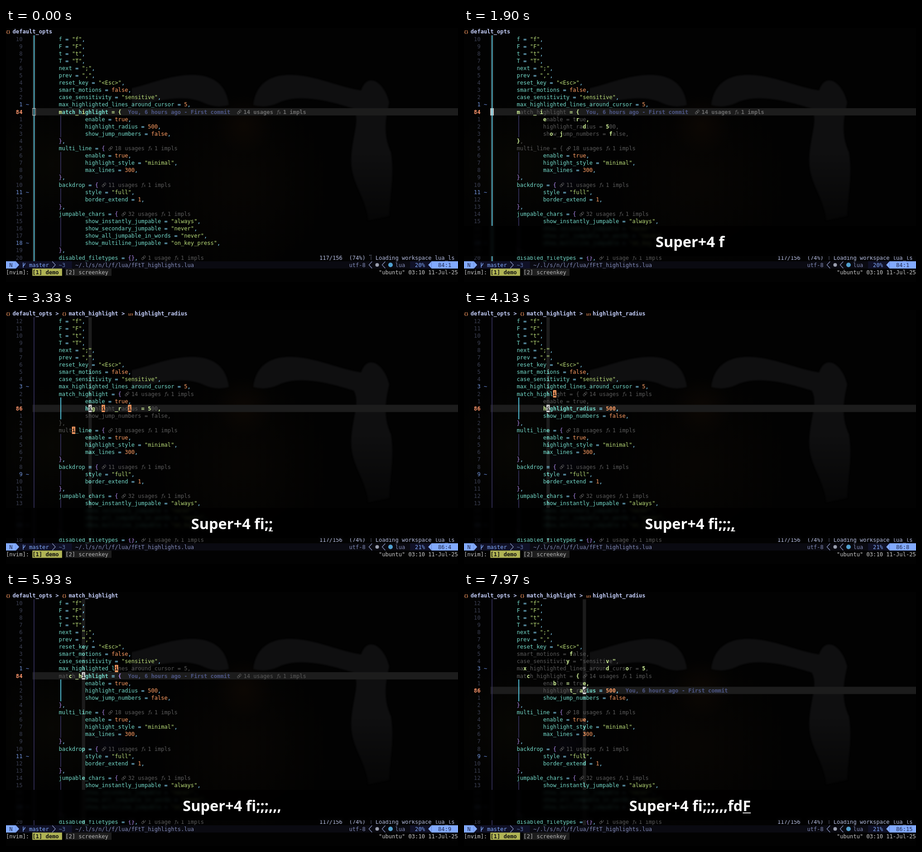
Write an HTML page with a canvas that moves like this. It is 998x561 px and loops after 8 s.

```html
<!DOCTYPE html>
<html lang="en">
<head>
<meta charset="utf-8">
<title>Editor motion demo</title>
<style>
html, body { margin: 0; width: 100%; height: 100%; overflow: hidden; background: #000; }
canvas { display: block; }
</style>
</head>
<body>
<canvas id="stage" width="998" height="561"></canvas>
<script>
const cv = document.getElementById('stage');
const ctx = cv.getContext('2d');
const WIDTH = 998, HEIGHT = 561, LOOP = 8000;
const CW = 7.283, RH = 16.1;
const MONO = '"DejaVu Sans Mono", monospace';
const REGULAR = `12.1px ${MONO}`, BOLD = `bold 12.1px ${MONO}`;

const C = {
  key: '#73daca', op: '#89ddff', str: '#b9dc78', num: '#ff9e64', brace: '#b18cf0',
  dim: '#5a5a5a', hit: '#ff9e64', jump: '#d3f59b', title: '#c0caf5',
  lens: '#5b5b5b', blame: '#4d5685', bar: '#1c1c1c', blue: '#82aaff', soft: '#828bb8'
};

// Code lines: column, text, usage count
const lines = [
  null,
  [16, 'f = "f",'], [16, 'F = "F",'], [16, 't = "t",'], [16, 'T = "T",'],
  [16, 'next = ";",'], [16, 'prev = ",",'], [16, 'reset_key = "<Esc>",'],
  [16, 'smart_motions = false,'], [16, 'case_sensitivity = "sensitive",'],
  [16, 'max_highlighted_lines_around_cursor = 5,'],
  [16, 'match_highlight = {', '14 usages'],
  [24, 'enable = true,'], [24, 'highlight_radius = 500,'], [24, 'show_jump_numbers = false,'],
  [16, '},'],
  [16, 'multi_line = {', '18 usages'],
  [24, 'enable = true,'], [24, 'highlight_style = "minimal",'], [24, 'max_lines = 300,'],
  [16, '},'],
  [16, 'backdrop = {', '11 usages'],
  [24, 'style = "full",'], [24, 'border_extend = 1,'],
  [16, '},'],
  [16, 'jumpable_chars = {', '32 usages'],
  [24, 'show_instantly_jumpable = "always",'], [24, 'show_secondary_jumpable = "never",'],
  [24, 'show_all_jumpable_in_words = "never",'], [24, 'show_multiline_jumpable = "on_key_press",'],
  [16, '},'],
  [16, 'disabled_filetypes = {},', '1 usage']
].map(l => l && { col: l[0], text: l[1], lens: l[2], colors: colorize(l[1]) });
const changed = [10, 22, 29];

function colorize(text) {
  const out = [];
  for (const [tok] of text.matchAll(/"[^"]*"|\w+|./g)) {
    const color = tok[0] === '"' ? C.str
      : /^(true|false|\d+)$/.test(tok) ? C.num
      : /\w/.test(tok) ? C.key
      : /[{}]/.test(tok) ? C.brace : C.op;
    for (const _ of tok) out.push(color);
  }
  return out;
}

// Key presses: time, key, cursor row, cursor column, direction, searched char, waiting for a char
const steps = [
  [0, '', 11, 8, 1], [450, 'Super+4', 11, 8, 1], [1500, 'f', 11, 8, 1, '', true],
  [2100, 'i', 11, 23, 1, 'i'], [2600, ';', 11, 27, 1, 'i'], [3100, ';', 13, 25, 1, 'i'],
  [3620, ';', 13, 29, 1, 'i'], [4120, ',', 13, 25, -1, 'i'], [4640, ',', 11, 27, -1, 'i'],
  [5130, ',', 11, 23, -1, 'i'], [6130, 'f', 11, 23, 1, '', true],
  [6870, 'd', 13, 36, 1, 'd'], [7770, 'F', 13, 36, -1, '', true]
].map(([at, key, row, col, dir, find, pending]) => ({ at, key, row, col, dir, find, pending }));

let typed = '', moved = -1000;
steps.forEach((s, i) => {
  const last = steps[i - 1];
  typed += (i === 2 ? ' ' : '') + s.key;
  if (last && (last.row !== s.row || last.col !== s.col)) moved = s.at;
  s.typed = typed;
  s.moved = moved;
  Object.assign(s, marks(s));
});

// Visits the characters from the cursor onwards, up to five lines away
function* walk({ row, col, dir }) {
  for (let k = 0; k <= 5; k++) {
    const r = row + dir * k, l = lines[r];
    if (!l) return;
    const n = l.text.length;
    let i = k ? (dir > 0 ? 0 : n - 1) : col - l.col + dir;
    if (dir > 0) i = Math.max(0, i);
    for (; i >= 0 && i < n; i += dir) yield [r, i, l.text[i]];
  }
}

function marks(s) {
  const id = (r, i) => r * 100 + i;
  const dim = new Set(), jump = new Set(), hit = new Set(), seen = new Set();
  const path = [];
  let used = false, lastRow = s.row, end = -1, otherRow = false;
  for (const [r, i, ch] of walk(s)) {
    path.push(id(r, i));
    const word = /[A-Za-z0-9]/.test(ch);
    if (!word || r !== lastRow) used = false;
    lastRow = r;
    if (ch !== ' ' && !seen.has(ch) && !used && (s.pending || r === s.row)) {
      jump.add(id(r, i));
      used = word;
    }
    seen.add(ch);
    if (s.find && ch === s.find && !otherRow) {
      hit.add(id(r, i));
      end = path.length;
      otherRow = r !== s.row;
    }
  }
  path.slice(0, s.pending ? path.length : Math.max(0, end)).forEach(p => dim.add(p));
  return { dim, jump, hit };
}

const stepAt = t => steps.findLast(s => s.at <= t) || steps[0];

function box(col, row, cols, color) {
  ctx.fillStyle = color;
  ctx.fillRect(col * CW, row * RH, cols * CW, RH);
}

function put(str, col, row, color, bold) {
  ctx.font = bold ? BOLD : REGULAR;
  ctx.fillStyle = color;
  [...str].forEach((ch, i) => ch !== ' ' && ctx.fillText(ch, (col + i) * CW, row * RH + 12.4));
}

function small(str, col, row, color, font, dy = 11.5) {
  ctx.font = font;
  ctx.fillStyle = color;
  ctx.fillText(str, col * CW, row * RH + dy);
}

function poly(points, color) {
  ctx.fillStyle = color;
  ctx.beginPath();
  points.forEach(([x, y]) => ctx.lineTo(x, y));
  ctx.fill();
}

function chevron(col, dir) {
  const x = (col + 0.5) * CW, y = 32.5 * RH;
  ctx.strokeStyle = '#8f9ac6';
  ctx.lineWidth = 1.1;
  ctx.beginPath();
  ctx.moveTo(x - 3.5 * dir, y - 7.5);
  ctx.lineTo(x + 3.5 * dir, y);
  ctx.lineTo(x - 3.5 * dir, y + 7.5);
  ctx.stroke();
}

function dot(x, y, r, color) {
  ctx.fillStyle = color;
  ctx.beginPath();
  ctx.arc(x, y, r, 0, 7);
  ctx.fill();
}

function drawLens(l, col, row, bold) {
  const color = bold ? '#6c6c6c' : C.lens;
  ctx.save();
  ctx.translate((col + 0.7) * CW, (row + 0.52) * RH);
  ctx.rotate(-Math.PI / 4);
  ctx.strokeStyle = color;
  ctx.lineWidth = 1;
  for (const x of [-5.2, -0.6]) {
    ctx.beginPath();
    ctx.roundRect(x, -2, 5.8, 4, 2);
    ctx.stroke();
  }
  ctx.restore();
  const fx = col + 3 + l.lens.length;
  put(l.lens, col + 2, row, color, bold);
  small('ƒ', fx, row, color, `italic 11px ${MONO}`);
  small('x', fx + 0.7, row, color, `8px ${MONO}`, 12.5);
  put('1 impls', fx + 2, row, color, bold);
}

const wall = makeWall();
function makeWall() {
  const el = document.createElement('canvas');
  el.width = WIDTH;
  el.height = HEIGHT;
  const g = el.getContext('2d');
  g.fillStyle = '#020202';
  g.fillRect(0, 0, WIDTH, HEIGHT);
  const glow = (x, y, r, rgb, a) => {
    const grad = g.createRadialGradient(x, y, 0, x, y, r);
    grad.addColorStop(0, `rgba(${rgb},${a})`);
    grad.addColorStop(1, `rgba(${rgb},0)`);
    g.fillStyle = grad;
    g.fillRect(x - r, y - r, 2 * r, 2 * r);
  };
  glow(525, 215, 65, '60,30,8', 0.14);
  glow(520, 340, 200, '45,30,10', 0.12);
  glow(220, 340, 60, '25,22,70', 0.14);
  glow(110, 300, 140, '40,36,12', 0.14);

  const fade = g.createLinearGradient(0, 270, 0, 430);
  fade.addColorStop(0, '#0f0f10');
  fade.addColorStop(1, '#050505');
  g.fillStyle = fade;
  const wing = () => {
    g.beginPath();
    g.moveTo(546, 170);
    g.bezierCurveTo(552, 118, 590, 100, 640, 104);
    g.bezierCurveTo(690, 108, 735, 130, 784, 138);
    g.bezierCurveTo(800, 92, 838, 125, 846, 165);
    g.bezierCurveTo(838, 200, 832, 235, 850, 275);
    g.bezierCurveTo(858, 325, 848, 365, 846, 415);
    g.lineTo(800, 425);
    g.bezierCurveTo(794, 370, 762, 345, 762, 290);
    g.bezierCurveTo(765, 235, 782, 205, 768, 178);
    g.bezierCurveTo(735, 168, 650, 140, 600, 166);
    g.quadraticCurveTo(572, 178, 546, 170);
    g.fill();
  };
  g.filter = 'blur(1.5px)';
  wing();
  g.translate(1038, 0);
  g.scale(-1, 1);
  g.beginPath();
  g.rect(530, 0, 230, HEIGHT);
  g.clip();
  wing();
  return el;
}

function drawTitle(s) {
  const crumb = (icon, name, col, font) => {
    small(icon, col, 0, C.num, font);
    put(name, col + 2, 0, C.title, true);
  };
  const braces = `bold 8px ${MONO}`;
  crumb('{}', 'default_opts', 0, braces);
  if (s.col > 8) {
    put('>', 15, 0, C.title, true);
    crumb('{}', 'match_highlight', 17, braces);
  }
  if (s.row === 13) {
    put('>', 35, 0, C.title, true);
    crumb('123', 'highlight_radius', 37, `bold 6px ${MONO}`);
  }
}

function drawCode(s, t) {
  const wordRow = t >= 4640 && t < 5130 ? 13 : -1;
  box(8, s.row, 130, C.bar);
  ctx.fillStyle = C.bar;
  ctx.fillRect(s.col * CW, RH, CW, 31 * RH);
  if (wordRow > 0) box(24, wordRow, 16, '#171717');

  const guide = (col, from, to, on) => {
    ctx.fillStyle = on ? '#4fb8cf' : '#37325f';
    ctx.fillRect(Math.floor((col + 0.5) * CW), from * RH, on ? 2 : 1.6, (to - from) * RH);
  };
  guide(8, 1, 32, s.col === 8);
  guide(16, 12, 15, s.col > 8);
  guide(16, 17, 20);
  guide(16, 22, 24);
  guide(16, 26, 30);

  lines.forEach((l, r) => {
    if (!l) return;
    const here = r === s.row;
    const num = String(here ? 73 + r : Math.abs(r - s.row));
    const mod = changed.includes(r);
    put(num, 5 - num.length, r, here ? '#ff966c' : mod ? '#7395dc' : '#3b3f52', here);
    if (mod) put('~', 6, r, '#6d93e8');

    [...l.text].forEach((ch, i) => {
      const id = r * 100 + i, col = l.col + i;
      const bold = here || col === s.col || (r === wordRow && i < 16);
      if (s.hit.has(id)) {
        box(col, r, 1, C.hit);
        put(ch, col, r, '#101010', true);
      } else if (s.jump.has(id)) put(ch, col, r, C.jump, true);
      else if (s.dim.has(id)) put(ch, col, r, C.dim);
      else put(ch, col, r, l.colors[i], bold);
    });

    let end = l.col + l.text.length;
    if (here && t - s.moved >= 500) {
      put('You, 6 hours ago - First commit', end + 2, r, C.blame, true);
      end += 34;
    }
    if (l.lens) drawLens(l, end + 1, r, here && s.col === 8);
  });

  if (t < 450) {
    ctx.strokeStyle = '#d0d0d0';
    ctx.lineWidth = 1;
    ctx.strokeRect(s.col * CW + 0.3, s.row * RH + 0.4, CW - 0.8, RH - 0.8);
  } else {
    box(s.col, s.row, 1, '#d8d8d8');
    if (s.col === 8) guide(8, s.row, s.row + 1, true);
    const l = lines[s.row];
    put(l.text[s.col - l.col] || ' ', s.col, s.row, '#111', true);
  }
}

function drawStatus(t) {
  const s = stepAt(Math.max(0, t - 150)), l = lines[s.row];
  put('117/156  (74%)', 95, 31, '#b4bcdf');
  for (const [x, y] of [[803, 502], [806, 502], [806, 506], [806, 510]]) dot(x, y, 0.8, C.title);
  put('Loading workspace lua_ls', 112, 31, '#b4bcdf');

  const y = 32 * RH, mid = y + RH / 2, low = y + RH;
  box(0, 32, 138, '#0a0a11');
  box(3, 32, 17, '#101127');
  box(0, 32, 3, C.blue);
  poly([[3 * CW, y], [4 * CW, mid], [3 * CW, low]], C.blue);
  put('N', 1, 32, '#222a4a');
  ctx.strokeStyle = C.blue;
  ctx.lineWidth = 1.4;
  ctx.beginPath();
  ctx.moveTo(38, y + 3);
  ctx.lineTo(38, y + 14);
  ctx.moveTo(42, y + 4);
  ctx.quadraticCurveTo(42, y + 8, 38, y + 10);
  ctx.stroke();
  put('master', 7, 32, C.blue);
  chevron(14, 1);
  put('~3', 16, 32, '#5f78b0');
  put('~/.l/s/n/l/f/lua/fFtT_highlights.lua', 21, 32, C.soft);

  put('utf-8', 104, 32, C.soft);
  chevron(110, -1);
  dot(819.5, mid, 4, '#9a9faf');
  chevron(114, -1);
  dot(849, mid, 5, '#51a0cf');
  put('lua', 118, 32, C.soft);
  box(122.5, 32, 7, '#101127');
  put(s.row === 11 ? '20%' : '21%', 124, 32, C.blue);
  poly([[129 * CW, y], [128 * CW, mid], [129 * CW, low]], C.blue);
  box(129, 32, 9, C.blue);
  put(`${73 + s.row}:${Math.max(1, s.col - l.col + l.col / 8)}`, 131, 32, '#222a4a');

  put('[nvim]:', 0, 33, '#c8c8c8');
  box(8, 33, 9, '#b0b455');
  put('[1] demo', 8, 33, '#111', true);
  box(18, 33, 14, '#1d1d1d');
  put('[2] screenkey', 18, 33, '#b8b8b8');
  put('"ubuntu" 03:10 11-Jul-25', 113, 33, '#c8c8c8');
}

function drawKeys(s, t) {
  const top = 437, h = 67;
  ctx.save();
  ctx.beginPath();
  ctx.rect(0, top, WIDTH, h);
  ctx.clip();
  ctx.filter = 'blur(3px)';
  ctx.drawImage(cv, 0, 0);
  ctx.filter = 'none';
  ctx.fillStyle = 'rgba(0,0,0,.84)';
  ctx.fillRect(0, top, WIDTH, h);
  ctx.restore();

  ctx.font = 'bold 32.5px "Noto Sans", "Open Sans", sans-serif';
  ctx.fillStyle = '#fff';
  const w = ctx.measureText(s.typed).width, x = 499 - w / 2;
  ctx.fillText(s.typed, x, 484);
  if (s.key.length === 1 && t - s.at < 300) {
    const kw = ctx.measureText(s.key).width;
    ctx.fillRect(x + w - kw, 487, kw, 1.8);
  }
}

function drawPointer() {
  const shape = [[0, 0], [0, 9], [2, 7.2], [3.3, 10], [4.8, 9.3], [3.6, 6.6], [6.2, 6.4]];
  ctx.save();
  ctx.translate(499, 280);
  poly(shape, '#fff');
  ctx.restore();
}

function draw(t) {
  const s = stepAt(t);
  ctx.drawImage(wall, 0, 0);
  drawTitle(s);
  drawCode(s, t);
  drawStatus(t);
  if (s.typed) drawKeys(s, t);
  if (t >= 450 && t < 1500) drawPointer();
}

const start = performance.now();
function frame(now) {
  draw(Math.max(0, now - start) % LOOP);
  requestAnimationFrame(frame);
}
draw(0);
requestAnimationFrame(frame);
</script>
</body>
</html>
```
